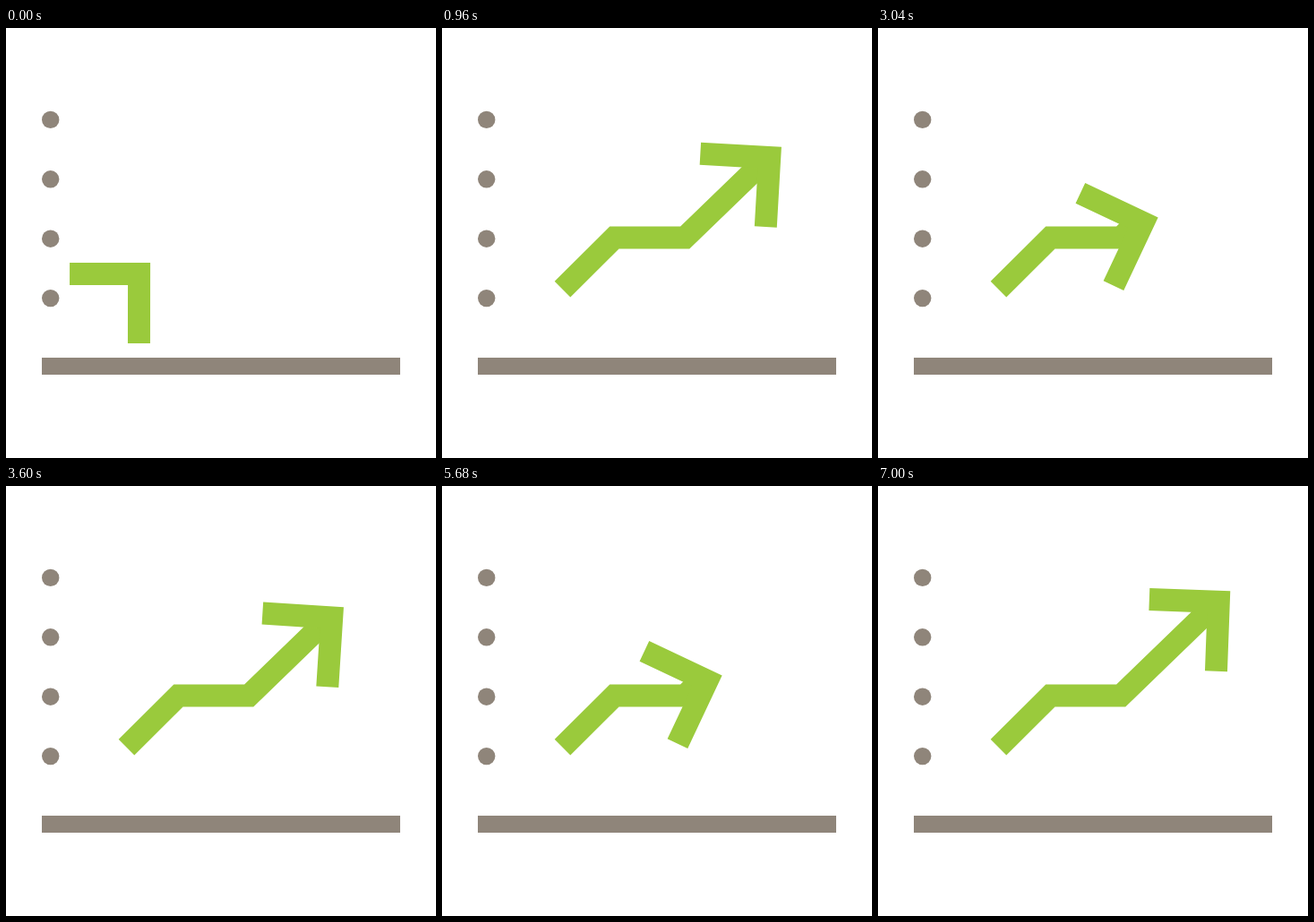
An HTML page that plays this animation: 480x480 px, repeating every 7.88 s.

```html
<!DOCTYPE html>
<html lang="en">
<head>
<meta charset="utf-8">
<title>Rising arrow</title>
<style>
  html, body { margin: 0; width: 100%; height: 100%; overflow: hidden; background: #fff; }
  svg { display: block; width: 100vw; height: 100vh; }
  .axis { fill: #8f857a; }
  .head { fill: #9aca3c; }
  .trail { fill: none; stroke: #9aca3c; stroke-width: 25; stroke-miterlimit: 10; }
</style>
</head>
<body>
<svg viewBox="0 0 480 480">
  <g class="axis">
    <circle cx="49.7" cy="102.4" r="9.7"/>
    <circle cx="49.7" cy="168.8" r="9.7"/>
    <circle cx="49.7" cy="235.2" r="9.7"/>
    <circle cx="49.7" cy="301.6" r="9.7"/>
    <rect x="40" y="368" width="400" height="19"/>
  </g>
  <path class="trail" id="trail" d="M134.5 291.6L192.5 234H271.2L379.5 129.2"/>
  <path class="head" id="head" d="M-33-57H57V33H32V-32H-33Z"/>
  <path id="route" fill="none" d="M104 319C215 208 221 281 334.2 172.2"/>
</svg>
<script>
  const LOOP = 7880, STEP = 40, RISE = 1640;
  const STARTS = [0, 2680, 5320];
  const [trail, head, route] = ['trail', 'head', 'route'].map(id => document.getElementById(id));
  const trailLen = trail.getTotalLength();
  const routeLen = route.getTotalLength();

  // cubic-bezier(.167, 0, 0, 1), solved by bisection
  function ease(x) {
    if (x <= 0) return 0;
    if (x >= 1) return 1;
    let lo = 0, hi = 1;
    for (let i = 0; i < 30; i++) {
      const u = (lo + hi) / 2;
      if (0.5 * u * (1 - u) ** 2 + u ** 3 < x) lo = u; else hi = u;
    }
    return lo * lo * (3 - 2 * lo);
  }

  function draw(time) {
    const t = Math.floor((time % LOOP) / STEP) * STEP;
    const start = STARTS.filter(s => s <= t).pop();
    const p = ease((t - start) / RISE);

    const at = p * routeLen;
    const pos = route.getPointAtLength(at);
    const a = route.getPointAtLength(Math.max(0, at - 0.5));
    const b = route.getPointAtLength(Math.min(routeLen, at + 0.5));
    const turn = 45 + Math.atan2(b.y - a.y, b.x - a.x) * 180 / Math.PI;
    const angle = Math.max(turn, 2.1 * p);
    head.setAttribute('transform', `translate(${pos.x} ${pos.y}) rotate(${angle})`);

    trail.style.visibility = p ? 'visible' : 'hidden';
    trail.setAttribute('stroke-dasharray', `${p * trailLen} ${trailLen + 1}`);
  }

  let begin;
  function tick(now) {
    begin ??= now;
    draw(now - begin);
    requestAnimationFrame(tick);
  }
  draw(0);
  requestAnimationFrame(tick);
</script>
</body>
</html>
```
